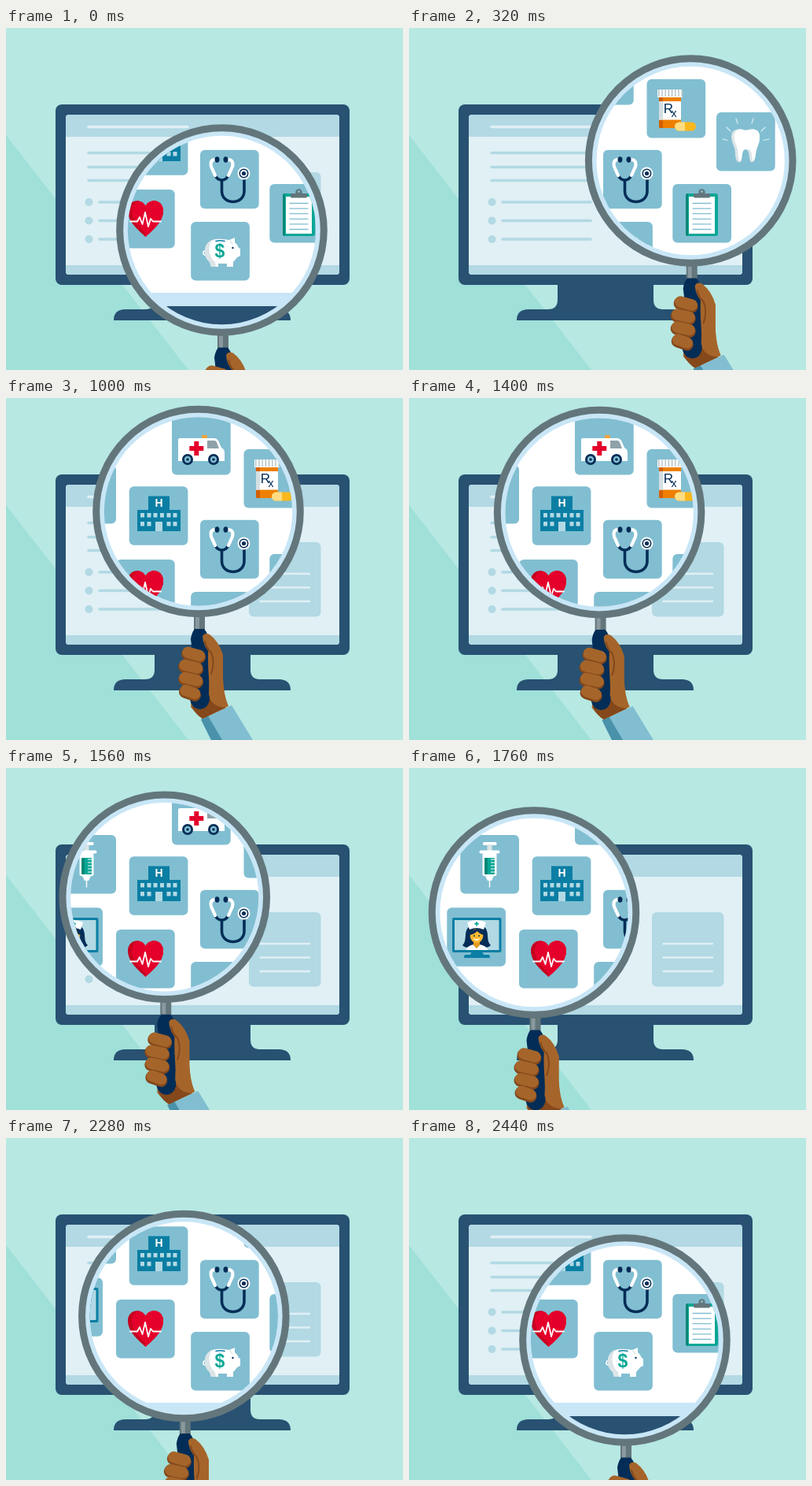
An HTML page with a canvas that plays this animation: 505 by 434 pixels, repeating every 2.88 s.

```html
<!DOCTYPE html>
<html lang="en">
<head>
<meta charset="utf-8">
<title>Magnifier over health icons</title>
<style>
html, body { margin: 0; width: 100%; height: 100%; overflow: hidden; background: #b7e8e2; }
canvas { display: block; width: 505px; height: 434px; }
</style>
</head>
<body>
<canvas id="stage"></canvas>
<script>
const W = 505, H = 434, LOOP = 2880, TICK = 40;
const canvas = document.getElementById('stage');
const ctx = canvas.getContext('2d');
const dpr = window.devicePixelRatio || 1;
canvas.width = W * dpr;
canvas.height = H * dpr;

const NAVY = '#285172', INK = '#032d57', PALE = '#e0f0f5', BAND = '#b2d9e4',
  TILE = '#81bed1', TEAL = '#0b7ea4', GREEN = '#0aa795', RED = '#e4002b',
  GREY = '#63767b', GLASS = '#c8e6f6', WHITE = '#fff', SKIN = '#a5652a', SHADE = '#84481b';

// Lens centre: start time, end time, from, to
const stops = [[274.5, 256.5], [358.2, 168.5], [244.5, 144], [159, 183.5]];
const moves = [[0, 320], [680, 1000], [1360, 1760], [2080, 2440]];

function rect(x, y, w, h, r, color) {
  ctx.fillStyle = color;
  ctx.beginPath();
  ctx.roundRect(x, y, w, h, r);
  ctx.fill();
}
function disc(x, y, r, color, ry = r) {
  ctx.fillStyle = color;
  ctx.beginPath();
  ctx.ellipse(x, y, r, ry, 0, 0, Math.PI * 2);
  ctx.fill();
}
function shape(d, color) {
  ctx.fillStyle = color;
  ctx.fill(new Path2D(d));
}
function line(d, color, width, cap = 'round') {
  ctx.strokeStyle = color;
  ctx.lineWidth = width;
  ctx.lineCap = cap;
  ctx.lineJoin = 'round';
  ctx.stroke(new Path2D(d));
}
function label(text, x, y, font, color) {
  ctx.font = font;
  ctx.fillStyle = color;
  ctx.textAlign = 'center';
  ctx.textBaseline = 'middle';
  ctx.fillText(text, x, y);
}
function within(d, draw) {
  ctx.save();
  ctx.clip(new Path2D(d));
  draw();
  ctx.restore();
}

function backdrop() {
  rect(0, 0, W, H, 0, '#b7e8e2');
  shape('M0 136L232 434H0Z', '#9fe0d9');
}

function monitor() {
  shape('M189 320V345Q189 357 177 357H152Q137 357 137 371H362Q362 357 347 357H323Q311 357 311 345V320Z', NAVY);
  rect(63, 97, 374, 229, 8, NAVY);
  rect(76, 110, 348, 203, 4, PALE);
  rect(76, 110, 348, 28, [4, 4, 0, 0], BAND);
  rect(76, 301, 348, 12, [0, 0, 4, 4], BAND);
  line('M105 125.5H231', PALE, 3.6);
  for (const y of [158.5, 176.5, 193.5]) line(`M105 ${y}H231`, BAND, 3.6);
  for (const y of [221, 244.5, 268]) {
    disc(105.5, y, 5, BAND);
    line(`M119 ${y}H231`, BAND, 3.6);
  }
  rect(309, 183, 91.5, 94.5, 6, BAND);
  for (const y of [223, 240.5, 258]) line(`M323.5 ${y}H386`, PALE, 2.4);
}

function ambulance() {
  rect(249, 47, 7, 5, 2, '#f2a23a');
  shape('M221 51H265Q268 51 270 54L274 63Q278 65 278 69V80H219V53Q219 51 221 51Z', WHITE);
  shape('M256 54H265Q267 54 268 56L271 64H256Z', '#8fa2a9');
  rect(239.3, 55, 6, 18, 0, RED);
  rect(233.3, 61, 18, 6, 0, RED);
  for (const x of [231, 264]) {
    disc(x, 78, 7, INK);
    disc(x, 78, 4.2, TILE);
    disc(x, 78, 1.8, INK);
  }
}

function medicine() {
  rect(318, 84, 28, 43, 2, '#ee7f00');
  rect(318, 84, 5, 43, [2, 0, 0, 2], '#d35f00');
  rect(316, 78, 32, 10, 1, WHITE);
  for (let x = 317; x < 348; x += 4.2) line(`M${x + .8} 78V87`, '#a9b7bb', 1.2, 'butt');
  rect(318, 93, 28, 23.5, 0, WHITE);
  rect(318, 93, 5, 23.5, 0, '#d5dfe2');
  label('R', 330, 103, '17px "Liberation Sans", Arial, sans-serif', INK);
  label('x', 337, 109, '14px "Liberation Sans", Arial, sans-serif', INK);
  rect(338, 119.5, 27, 11, 5.5, '#fbb81c');
  rect(338, 119.5, 13, 11, [5.5, 0, 0, 5.5], '#ffdc83');
}

function tooth() {
  const d = 'M410 138C410 129 418 126 428 130C438 126 447 129 446 139C446 147 442 151 441 160C440 168 438 171 435 170C432 168 434 154 428 154C422 154 425 168 421 170C417 172 415 165 415 159C415 150 410 146 410 138Z';
  shape(d, '#dbe4e7');
  within(d, () => {
    ctx.save();
    ctx.translate(3.5, 0);
    shape(d, WHITE);
    ctx.restore();
  });
  line('M399 141L405 142.5M404 126L409 131M416 115L418 121M438 115L436 121M453 126L448 131M458 141L451 142.5', '#d9eef4', 1.2);
}

function stethoscope() {
  line('M266 187C270 195 279 195 283 187M274.5 194V207C274.5 225 303 225 303 207V192', INK, 3.6);
  line('M266 167C260 167 260 172 261 176L266 187M282 167C289 167 289 172 288 176L283 187', WHITE, 4.2);
  disc(268.5, 167, 3, INK, 3.7);
  disc(279.5, 167, 3, INK, 3.7);
  disc(302.5, 184.5, 8, WHITE);
  disc(302.5, 184.5, 6, INK);
  disc(302.5, 184.5, 4.5, WHITE);
  disc(302.5, 184.5, 2.6, INK);
}

function hospital() {
  rect(167, 142, 55, 27, 0, TEAL);
  rect(181, 124.5, 27, 44.5, 0, TEAL);
  label('H', 194.5, 134.5, 'bold 14px "Liberation Sans", Arial, sans-serif', WHITE);
  [171, 179.5, 187.5, 196, 204.5, 212.5].forEach((x, i) => {
    rect(x, 146, 5, 5.5, 0, BAND);
    if (i < 2 || i > 3) rect(x, 157, 5, 5.5, 0, BAND);
  });
  rect(190, 157, 9, 12, 0, BAND);
}

function heart() {
  const d = 'M177.5 265C169 257 155 246 155 232C155 218 172 215 177.5 226C183 215 200 218 200 232C200 246 186 257 177.5 265Z';
  shape(d, '#c4001f');
  within(d, () => {
    ctx.save();
    ctx.translate(5, 0);
    shape(d, RED);
    ctx.restore();
    rect(177, 215, 24, 52, 0, RED);
  });
  line('M158 245.5H167L170 240L173.5 249L177 234L181 252L184 242L187 245.5H197', WHITE, 1.8);
}

function piggy() {
  line('M254 288Q249 288 252 283', WHITE, 1.8);
  shape('M253 284C253 271 263 267 275 268C279 268 282 269 284 269L291 266V272Q295 275 296 279L298 280V289L294 291Q291 295 289 297V303H281V299H270V303H261L259 297Q253 292 253 284Z', WHITE);
  shape('M253 284C253 275 257 271 262 269C256 277 258 291 266 297L267 303H261L259 297Q253 292 253 284Z', '#dbe4e7');
  line('M267 270.5Q272 269 278 270.5', TEAL, 1.5);
  disc(288.5, 279, 1.2, INK);
  line('M285 270L288 274', '#dbe4e7', 1.3);
  label('$', 272, 285, 'bold 23px "Liberation Sans", Arial, sans-serif', GREEN);
}

function clipboard() {
  rect(352, 210, 41, 54, 3, GREEN);
  rect(352, 210, 3, 54, [3, 0, 0, 3], '#078878');
  rect(356, 214, 33, 47, 0, WHITE);
  for (let i = 0; i < 6; i++) line(`M361 ${222.5 + i * 6.6}H384`, TILE, 1.3);
  disc(372.5, 208.5, 4.2, GREY);
  disc(372.5, 207.5, 1.5, TILE);
  rect(362, 210, 21, 5.5, 1.5, GREY);
}

function syringe() {
  rect(94, 94, 17.5, 4, 1.5, WHITE);
  rect(99.5, 97, 6, 15, 0, '#dbe4e7');
  rect(93.5, 108, 18, 29, 2, WHITE);
  rect(96, 114, 13, 21, 1, GREEN);
  rect(96, 114, 4, 21, [1, 0, 0, 1], '#078878');
  rect(89.5, 104.5, 26, 4, 2, WHITE);
  for (let y = 116; y < 134; y += 4) line(`M104 ${y}H109`, WHITE, 1, 'butt');
  shape('M97 137H108L105 143H100Z', WHITE);
  line('M102.5 142V151', WHITE, 1.4);
}

function nurse() {
  rect(55, 190, 62.5, 44, 2, TEAL);
  rect(58, 193, 56.5, 38, 0, BAND);
  shape('M80 233H93L95 237H101Q103 237 103 241H70Q70 237 72 237H78Z', TEAL);
  within('M58 190H114.5V231H58Z', () => {
    shape('M74 204C78 198 95 198 98 204C102 212 98 219 104 225Q99 230 94 226H78Q73 230 68 225C74 219 70 211 74 204Z', INK);
    shape('M72 233Q73 226 82 224H90Q100 226 101 233Z', WHITE);
    shape('M82 218H90V225L86 229L82 225Z', '#e39a21');
    disc(86, 213, 8.3, '#fdb92e', 9);
    shape('M77 212Q78 205 87 204Q95 206 95 212Q89 210 87 207Q83 211 77 212Z', INK);
    shape('M74 196Q86 190 98 196L95 205Q86 201 77 205Z', WHITE);
    line('M86 195V200.5M83.2 197.7H88.8', GREEN, 1.7, 'butt');
    disc(83, 213, .9, INK);
    disc(89, 213, .9, INK);
    line('M83 217Q86 219.5 89 217', WHITE, 1.5);
  });
}

const tiles = [
  [211, 23, ambulance], [302.5, 65, medicine], [391, 107, tooth],
  [247, 154.8, stethoscope], [156.7, 112.3, hospital], [140, 205, heart],
  [235.2, 246, piggy], [335.3, 198, clipboard], [65.3, 85, syringe], [48.3, 177.3, nurse]
];

function closeUp() {
  rect(0, 0, W, 336, 0, WHITE);
  rect(0, 336, W, 17, 0, GLASS);
  rect(0, 353, W, 81, 0, NAVY);
  for (const [x, y, icon] of tiles) {
    rect(x, y, 74.7, 74.5, 6, TILE);
    icon();
  }
}

function lens(x, y) {
  disc(x, y, 127, GLASS);
  ctx.save();
  ctx.beginPath();
  ctx.arc(x, y, 119.7, 0, Math.PI * 2);
  ctx.clip();
  closeUp();
  ctx.restore();
  ctx.strokeStyle = GREY;
  ctx.lineWidth = 9;
  ctx.beginPath();
  ctx.arc(x, y, 129.8, 0, Math.PI * 2);
  ctx.stroke();
}

// Drawn for a lens centred on stops[2]
function hand() {
  rect(239, 276, 14, 20, 0, GREY);
  rect(241, 278, 5, 18, 0, '#89999d');
  shape('M248 408L287 390L314 434H261Z', TILE);
  shape('M248 408L257 403.5L275 434H261Z', '#4a91aa');
  shape('M256 305L276 326V357Q277 378 283 391L250 407Q243 402 235 392L238 360Z', SKIN);
  shape('M236 392L258 378Q262 392 280 393L250 407Q242 402 236 392Z', SHADE);
  shape('M240 293H252Q257 299 258 306Q256 330 258 355L259 383Q257 394 247 395Q236 394 234 383L236 350Q238 325 235 306Q236 298 240 293Z', INK);
  shape('M250 303Q252 297 259 300Q271 309 276 326V358Q277 376 281 387Q268 388 258 377Q258 360 262 349Q265 336 261 325Q251 316 250 303Z', SKIN);
  line('M253 309Q255 318 261 323Q266 335 261 350', SHADE, 2);
  const fingers = [[231, 323, 246, 327], [227, 339, 243, 342.5], [227, 355, 243, 358.5], [228, 371, 240, 375]];
  for (const [x1, y1, x2, y2] of fingers) {
    line(`M${x1} ${y1 + 2}L${x2} ${y2 + 2}`, SHADE, 16);
    line(`M${x1 + .5} ${y1}L${x2} ${y2}`, SKIN, 14.5);
  }
}

function lensAt(t) {
  let pos = stops[0];
  moves.forEach(([start, end], i) => {
    if (t < start) return;
    const p = Math.min(1, (t - start) / (end - start));
    const e = p * p * (3 - 2 * p);
    const from = stops[i], to = stops[(i + 1) % stops.length];
    pos = from.map((v, k) => v + (to[k] - v) * e);
  });
  return pos;
}

function draw(t) {
  const [x, y] = lensAt(t);
  ctx.setTransform(dpr, 0, 0, dpr, 0, 0);
  backdrop();
  monitor();
  ctx.save();
  ctx.translate(x - stops[2][0], y - stops[2][1]);
  hand();
  ctx.restore();
  lens(x, y);
}

const began = performance.now();
function frame(now) {
  const t = Math.max(0, now - began) % LOOP;
  draw(Math.floor(t / TICK) * TICK);
  requestAnimationFrame(frame);
}
draw(0);
requestAnimationFrame(frame);
</script>
</body>
</html>
```
